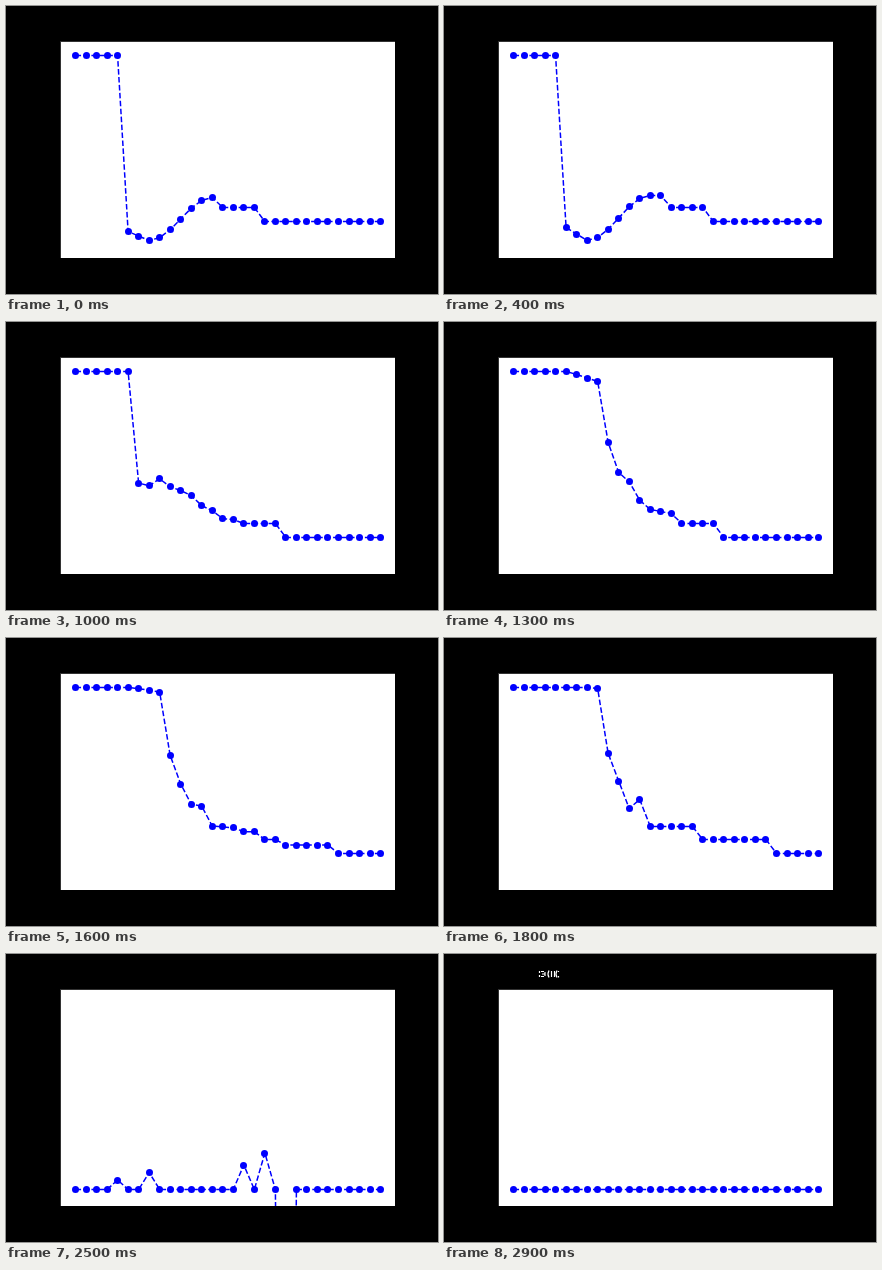
An HTML page for the animation above (3000 ms loop, 432 by 288 pixels).

```html
<!DOCTYPE html>
<html lang="en">
<head>
<meta charset="utf-8">
<title>Dashed series</title>
<style>
html, body { margin: 0; width: 100%; height: 100%; overflow: hidden; background: #000; }
svg { display: block; width: 432px; height: 288px; }
</style>
</head>
<body>
<svg viewBox="0 0 432 288">
  <defs><clipPath id="area"><rect x="55" y="36" width="334" height="216"/></clipPath></defs>
  <rect width="432" height="288" fill="#000"/>
  <rect x="54" y="35" width="335" height="217" fill="#333"/>
  <rect x="55" y="36" width="334" height="216" fill="#fff"/>
  <g clip-path="url(#area)">
    <path id="line" fill="none" stroke="#00f" stroke-width="1.5" stroke-dasharray="5.55 2.4" stroke-linejoin="round"/>
    <g id="dots" fill="#00f"></g>
  </g>
  <path id="title" fill="none" stroke="#fff" stroke-width="1.2"
    d="M95.5 17v2M95.5 21v2M97 17.5h3M98 20h3M97 22.5h3M101 18v4M105 16.5q-2 3.5 0 7M107.5 17v6M110.5 17v6M113 16.5q-2 3.5 0 7M114.5 17v1M114.5 22v1.5"/>
</svg>
<script>
const COUNT = 30, STEP = 100, LOOP = 3000;
const TOP = 49, SHELF = 201, TAIL = 215, BASE = 235;
const SWITCH = 2000, END = 2900;
const $ = id => document.getElementById(id);
const xAt = i => 69.5 + i * 10.52;
const snap = v => Math.floor(v) + 0.5;
const mix = (a, b, u) => a + (b - a) * u;
const ease = u => (1 - Math.cos(Math.PI * u)) / 2;

// Plateau, eased descent through a few [index, y] keys, shelf, tail.
function shape(keys, shelf, tail) {
  return Array.from({ length: COUNT }, (_, i) => {
    if (i < keys[0][0]) return TOP;
    if (i >= tail) return TAIL;
    if (i >= shelf) return SHELF;
    const k = keys.findIndex(p => p[0] > i);
    if (k < 0) return keys[keys.length - 1][1];
    const [i0, y0] = keys[k - 1], [i1, y1] = keys[k];
    return mix(y0, y1, ease((i - i0) / (i1 - i0)));
  });
}

const poses = [
  { t: 0, y: shape([[5, 225], [7, 234], [13, 191]], 14, 18) },
  { t: 400, y: shape([[5, 221], [7, 234], [13, 189]], 15, 19) },
  { t: 800, y: shape([[6, 233], [7, 235], [10, 180], [13, 189]], 14, 20) },
  { t: 1300, y: shape([[6, 52], [8, 59], [9, 120], [10, 150], [13, 187], [15, 191]], 16, 20) },
  { t: 1800, y: shape([[8, 50], [9, 115], [11, 170], [12, 161], [13, 188]], 18, 25) }
];
const spikes = [[2, 19], [5, 34], [14, 49], [16, 73], [18, -2000]];

function curve(t) {
  const k = poses.findIndex(p => p.t > t);
  if (k < 0) return poses[poses.length - 1].y;
  const a = poses[k - 1], b = poses[k];
  return a.y.map((y, i) => mix(y, b.y[i], (t - a.t) / (b.t - a.t)));
}

// Spikes travel right and fade to the base line.
function pulses(t) {
  const y = Array(COUNT).fill(BASE);
  const shift = Math.floor((t - 2100) / 200);
  const fade = Math.min(1, (END - t) / 800);
  for (const [i, h] of spikes) y[i + shift] -= h * fade;
  return y;
}

const dots = Array.from({ length: COUNT }, (_, i) => {
  const c = document.createElementNS("http://www.w3.org/2000/svg", "circle");
  c.setAttribute("cx", snap(xAt(i)));
  c.setAttribute("r", 3.5);
  return $("dots").appendChild(c);
});

function draw(time) {
  const t = Math.floor((time % LOOP) / STEP) * STEP;
  const ys = (t < SWITCH ? curve(t) : pulses(t)).map(y => y + 0.5);
  $("line").setAttribute("d", "M" + ys.map((y, i) => `${xAt(i).toFixed(2)} ${y.toFixed(2)}`).join("L"));
  dots.forEach((c, i) => c.setAttribute("cy", snap(ys[i])));
  $("title").setAttribute("visibility", t >= END ? "visible" : "hidden");
}

const start = performance.now();
function tick() {
  draw(performance.now() - start);
  requestAnimationFrame(tick);
}
tick();
</script>
</body>
</html>
```
